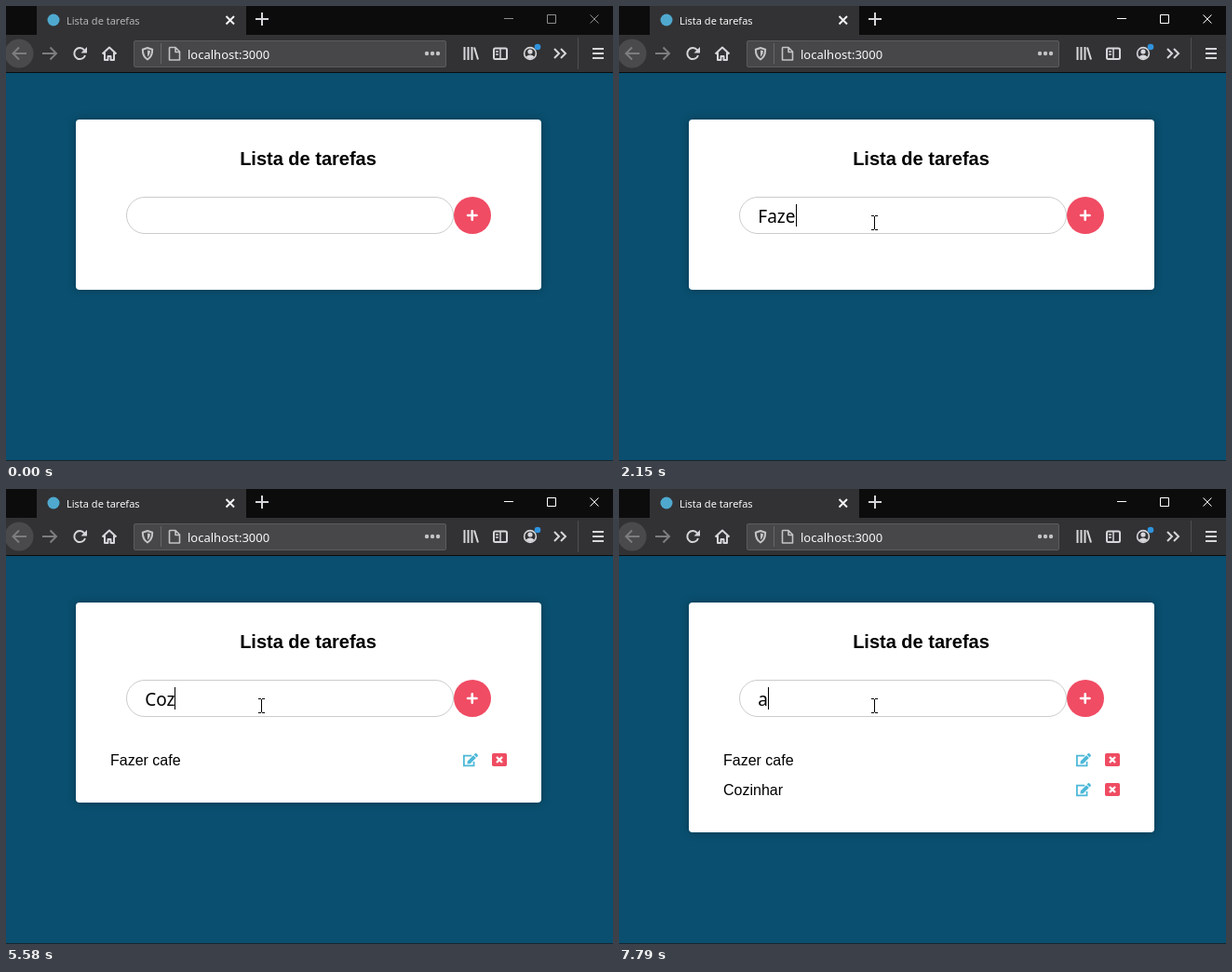
Recreate the animation shown at these times as an HTML page. Size 652 by 489 pixels, loop 8 s.

```html
<!DOCTYPE html>
<html lang="pt">
<head>
<meta charset="utf-8">
<title>Lista de tarefas</title>
<style>
  html, body { margin: 0; width: 652px; height: 489px; overflow: hidden; background: #0a4f6f; }
  svg { display: block; }
  .ui { font-family: "Noto Sans", "Open Sans", sans-serif; }
  .page { font-family: "Liberation Sans", Arial, sans-serif; }
  .line { fill: none; stroke: #d7d7db; stroke-width: 2; }
  .thin { fill: none; stroke: #8d8d8d; stroke-width: 1; }
  .dim { fill: none; stroke: #7d7d80; stroke-width: 2; }
  #tabTitle { fill: #b4b4b6; }
  .focused .thin { stroke: #fff; }
  .focused #tabTitle { fill: #f9f9fa; }
  #card { filter: drop-shadow(0 0 4px rgba(0, 0, 0, .28)); }
  #typed { white-space: pre; }
</style>
</head>
<body>
<svg id="stage" width="652" height="489" viewBox="0 0 652 489">
  <defs>
    <g id="actions">
      <g transform="translate(491 284) scale(.0278)">
        <path d="M330 96H32V480H416V325" fill="none" stroke="#4db8d8" stroke-width="64"/>
        <path d="M396 78L498 180 274 406 160 416 170 302ZM418 54L460 12Q488-10 515 12L564 61Q586 88 564 116L522 158Z" fill="#4db8d8"/>
      </g>
      <rect x="522" y="284" width="16" height="14" rx="1.8" fill="#ef4c62"/>
      <path d="M527 288l6 6m0-6l-6 6" stroke="#fff" stroke-width="2.4"/>
    </g>
  </defs>

  <rect width="652" height="489" fill="#0a4f6f"/>
  <rect y="488" width="652" height="1" fill="#17262e"/>

  <!-- tab strip -->
  <rect width="652" height="31" fill="#0c0c0d"/>
  <path d="M33 0H258V31H652V71H0V31H33Z" fill="#323234"/>
  <rect y="71" width="652" height="1" fill="#0c0c0d"/>
  <circle cx="51" cy="15" r="6.5" fill="#4fa9cf"/>
  <text id="tabTitle" class="ui" x="65" y="20" font-size="11">Lista de tarefas</text>
  <path class="line" style="stroke:#f4f4f5" d="M236.500 11l8.500 8.500m0-8.500l-8.500 8.500"/>
  <path class="line" d="M268 14h14M275 7v14" stroke-width="1.800"/>
  <path class="thin" d="M535 13.500h10M581.500 9.500h9v9h-9zM627.500 9.500l9 9m0-9l-9 9"/>

  <!-- toolbar -->
  <circle cx="14" cy="51" r="15.500" fill="#4a4a4c"/>
  <path class="dim" d="M22 51H8M14 44.500L7.500 51l6.500 6.500"/>
  <path class="dim" d="M39 51h14M47.500 44.500L54 51l-6.500 6.500"/>
  <path class="line" d="M84 47.300A6 6 0 1 0 85 53"/>
  <path d="M87 44v6.500h-6.500z" fill="#d7d7db"/>
  <path class="line" d="M103.500 51.500l7.500-7 7.500 7M106 50v8h3.500v-4h3v4h3.500v-8" stroke-linejoin="round"/>
  <rect x="137.500" y="37.500" width="335" height="28" rx="1.500" fill="#474749" stroke="#5c5c5e"/>
  <path class="line" d="M152 45l5.200 1.700c0 5-1.200 8.300-5.200 10.800-4-2.500-5.200-5.800-5.200-10.800z" stroke-linejoin="round" style="stroke:#c4c4c7"/>
  <path d="M152 47.500v7c2-1.600 2.800-3.500 3-6.200z" fill="#c4c4c7"/>
  <path d="M166.500 40v22" stroke="#68686a"/>
  <path class="line" d="M176 44.500h6l4.500 4.500v9h-11v-13zM182 45v4.500h4.500" style="stroke:#c4c4c7;stroke-width:1.600" stroke-linejoin="round"/>
  <text class="ui" x="195" y="57" font-size="13" fill="#f9f9fa">localhost:3000</text>
  <g fill="#c4c4c7">
    <circle cx="452" cy="51" r="2.200"/><circle cx="458" cy="51" r="2.200"/><circle cx="464" cy="51" r="2.200"/>
  </g>
  <path class="line" d="M492.500 44v14M496.500 44v14M500.500 44v14M503 44.500l4 13"/>
  <rect class="line" x="524" y="45.500" width="14" height="11.500" rx="1.500"/>
  <path class="line" d="M531 45v12M526 49h3M526 52h3" style="stroke-width:1.500"/>
  <circle class="line" cx="563" cy="51" r="6.400" style="stroke-width:1.600"/>
  <circle cx="563" cy="49" r="2.600" fill="#d7d7db"/>
  <path d="M558.500 54.500q4.500-4 9 0-4.500 5-9 0z" fill="#d7d7db"/>
  <circle cx="571" cy="44" r="3.300" fill="#2f93dd"/>
  <path class="line" d="M589 46l5 5-5 5M596 46l5 5-5 5"/>
  <path d="M614.500 34v34" stroke="#505052"/>
  <path class="line" d="M630 46h12M630 51h12M630 56h12"/>

  <!-- page -->
  <rect id="card" x="75" y="122" width="500" height="183" rx="4" fill="#fff"/>
  <text class="page" x="324.500" y="171" font-size="20" font-weight="bold" text-anchor="middle">Lista de tarefas</text>
  <rect x="129.500" y="205.500" width="351" height="39" rx="19.500" fill="#fff" stroke="#ccc"/>
  <circle cx="501" cy="225" r="20" fill="#f04c64"/>
  <path d="M496 225h9.500M500.750 220.250v9.500" stroke="#fff" stroke-width="2.600" stroke-linecap="round"/>
  <text id="typed" class="ui" x="149.300" y="233" font-size="19"></text>
  <rect id="caret" y="213" width="1" height="24"/>
  <g class="item page" font-size="16">
    <text x="112" y="297">Fazer cafe</text><use href="#actions"/>
  </g>
  <g class="item page" font-size="16" transform="translate(0 32)">
    <text x="112" y="297">Cozinhar</text><use href="#actions"/>
  </g>

  <path id="arrow" d="M.5.500v16l3.700-3.500 2.400 5.500 2.400-1-2.400-5.300h5z" fill="#fff" stroke="#000"/>
  <path id="beam" d="M-3-8h3v1h1v-1h3v1h-3v14h3v1h-3v-1h-1v1h-3v-1h3v-14h-3z"/>
</svg>
<script>
  const LOOP = 8000, FOCUS = 790;

  // time, input text, caret x (0 = hidden)
  const typing = [
    [0, "", 0], [FOCUS, "", 150], [1290, "", 0],
    [1530, "F", 160], [1720, "Fa", 170], [1850, "Faz", 179], [2150, "Faze", 190],
    [2330, "Fazer", 197], [2400, "Fazer ", 203], [2640, "Fazer c", 213],
    [2760, "Fazer ca", 223], [2900, "Fazer caf", 229], [3020, "Fazer cafe", 240],
    [3400, "", 150], [3970, "", 0], [4470, "", 150],
    [4590, "C", 162], [4900, "Co", 172], [5080, "Coz", 0], [5580, "Coz", 181],
    [6010, "Cozi", 186], [6150, "Cozin", 197], [6400, "Cozinh", 208],
    [6470, "Cozinha", 219], [6650, "Cozinhar", 226],
    [6900, "", 150], [7150, "", 0], [7720, "", 150], [7790, "a", 160]
  ];

  // time, pointer x, y
  const pointer = [
    [150, 502, 474], [210, 450, 440], [270, 397, 402], [340, 372, 385],
    [400, 350, 368], [460, 335, 345], [520, 320, 322], [590, 280, 256],
    [660, 255, 223], [730, 255, 219], [FOCUS, 255, 216], [970, 265, 225], [1040, 274, 233]
  ];

  const added = [[0, 0], [3400, 1], [6900, 2]];

  const $ = id => document.getElementById(id);
  const items = document.querySelectorAll(".item");
  const at = (steps, t) => steps.filter(s => s[0] <= t).pop();
  const show = (el, on) => el.setAttribute("visibility", on ? "visible" : "hidden");

  function place(el, on, x, y) {
    show(el, on);
    if (on) el.setAttribute("transform", `translate(${x} ${y})`);
  }

  function draw(t) {
    const [, text, caretX] = at(typing, t);
    $("typed").textContent = text;
    $("caret").setAttribute("x", caretX);
    show($("caret"), caretX);

    const count = at(added, t)[1];
    $("card").setAttribute("height", 183 + 32 * count);
    items.forEach((el, i) => show(el, i < count));

    const spot = at(pointer, t);
    const [, x, y] = spot || [0, 0, 0];
    const overInput = y > 205 && y < 245;
    place($("arrow"), spot && !overInput, x, y);
    place($("beam"), spot && overInput, x, y);

    $("stage").classList.toggle("focused", t >= FOCUS);
  }

  const start = performance.now();
  function tick() {
    draw((performance.now() - start) % LOOP);
    requestAnimationFrame(tick);
  }
  tick();
</script>
</body>
</html>
```
